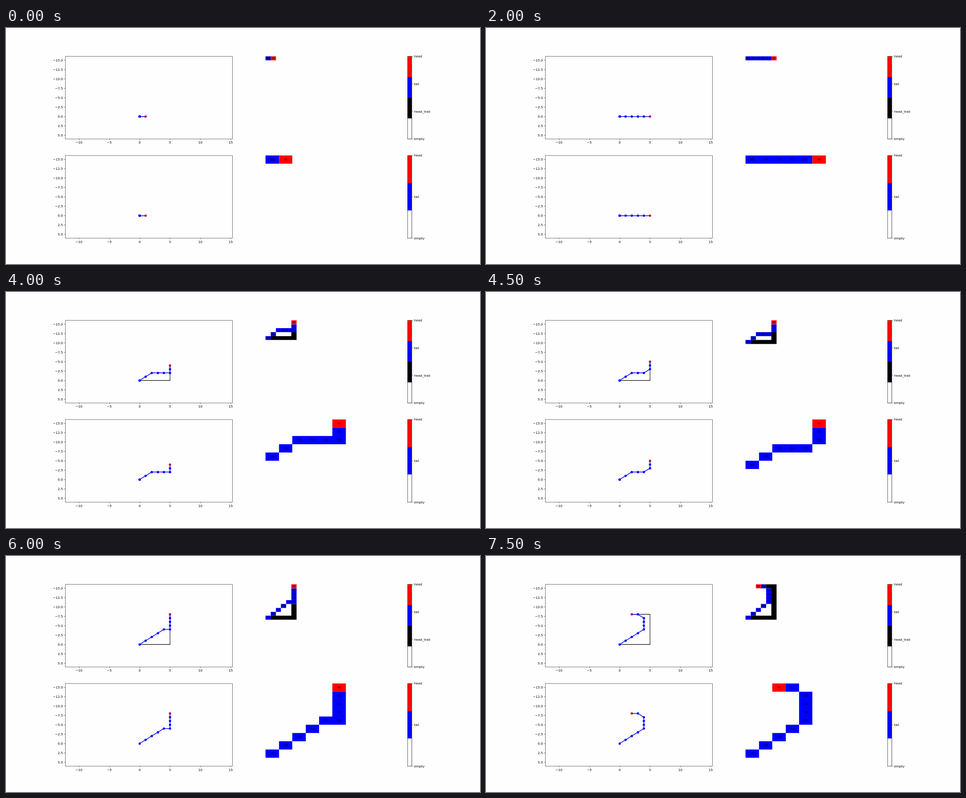
Animation, 1058 px wide and 529 px high, one loop 8 s. Source, as an HTML page with a canvas:

```html
<!DOCTYPE html>
<html lang="en">
<head>
<meta charset="utf-8">
<title>Rope simulation</title>
<style>
html, body { margin: 0; width: 100%; height: 100%; overflow: hidden; background: #fefefe; }
canvas { display: block; }
</style>
</head>
<body>
<canvas id="stage" width="1058" height="529"></canvas>
<script>
const ctx = document.getElementById("stage").getContext("2d");
const STEP_MS = 500, STEPS = 16, KNOTS = 10;
const PAPER = "#fefefe", RED = "#ff0000", BLUE = "#0000ff", BLACK = "#000000";

// The figure is laid out on a 2000 x 1000 sheet at 100 dots per inch.
const SCALE = 0.529, PT = 100 / 72;
const PLOT_X = 250, PLOT_W = 1550 / 2.2, PANEL_H = 350;
const GRID_X = PLOT_X + PLOT_W * 1.2, GRID_W = PLOT_W * 0.8;
const BAR_X = GRID_X + PLOT_W * 0.85, BAR_W = 17.5;
const X_MIN = -12.25, X_SPAN = 27.5, Y_MIN = -16, Y_SPAN = 22;
const TICK = 3.5 * PT, TICK_BASE = 5.3, CELL_BASE = 4;

const rows = [
  { top: 120, cols: 26, lines: 21, trail: true,
    legend: [["head", RED], ["tail", BLUE], ["head_trail", BLACK], ["empty", PAPER]] },
  { top: 540, cols: 10, lines: 10, trail: false,
    legend: [["head", RED], ["tail", BLUE], ["empty", PAPER]] }
];

const snap = v => Math.floor(v + 0.5) + 0.5;
const plotX = x => PLOT_X + (x - X_MIN) / X_SPAN * PLOT_W;
const plotY = (y, top) => top + (y - Y_MIN) / Y_SPAN * PANEL_H;
const minus = s => s.replace("-", "\u2212");

// Each knot steps towards the one ahead once it is no longer adjacent.
function simulate() {
  let rope = Array.from({ length: KNOTS }, () => [0, 0]);
  const trail = [[0, 0]], states = [];
  for (let i = 0; i < STEPS; i++) {
    const move = i < 5 ? [1, 0] : i < 13 ? [0, -1] : [-1, 0];
    rope = rope.map(k => k.slice());
    rope[0][0] += move[0];
    rope[0][1] += move[1];
    for (let k = 1; k < KNOTS; k++) {
      const dx = rope[k - 1][0] - rope[k][0], dy = rope[k - 1][1] - rope[k][1];
      if (Math.max(Math.abs(dx), Math.abs(dy)) > 1) {
        rope[k][0] += Math.sign(dx);
        rope[k][1] += Math.sign(dy);
      }
    }
    trail.push(rope[0]);
    states.push({ rope, trail: trail.slice() });
  }
  return states;
}

function segment(x1, y1, x2, y2) {
  ctx.beginPath();
  ctx.moveTo(x1, y1);
  ctx.lineTo(x2, y2);
  ctx.stroke();
}

function label(text, x, baseline, align) {
  ctx.fillStyle = BLACK;
  ctx.textAlign = align;
  ctx.fillText(text, x, baseline);
}

function frame(x, y, w, h) {
  const left = snap(x), top = snap(y);
  ctx.strokeRect(left, top, snap(x + w) - left, snap(y + h) - top);
}

function drawAxes(top) {
  const bottom = top + PANEL_H;
  for (let x = -10; x <= 15; x += 5) {
    const px = plotX(x);
    segment(snap(px), bottom, snap(px), bottom + TICK);
    label(minus(String(x)), px, bottom + 2 * TICK + 10.7, "center");
  }
  for (let y = -15; y <= 5; y += 2.5) {
    const py = plotY(y, top);
    segment(PLOT_X - TICK, snap(py), PLOT_X, snap(py));
    label(minus(y.toFixed(1)), PLOT_X - 2 * TICK, py + TICK_BASE, "right");
  }
  frame(PLOT_X, top, PLOT_W, PANEL_H);
}

function drawLegend({ top, legend }) {
  const n = legend.length, band = PANEL_H / n, gap = PANEL_H / (n - 1);
  const left = Math.round(BAR_X), end = BAR_X + BAR_W;
  // Every band reaches the bottom, so the next one covers it without a seam.
  legend.forEach(([, color], i) => {
    const y = Math.round(top + i * band);
    ctx.fillStyle = color;
    ctx.fillRect(left, y, Math.round(end) - left, top + PANEL_H - y);
  });
  frame(BAR_X, top, BAR_W, PANEL_H);
  legend.forEach(([name], i) => {
    const y = top + i * gap;
    segment(end, snap(y), end + TICK, snap(y));
    label(name, end + 2 * TICK, y + TICK_BASE, "left");
  });
}

function polyline(points, top, color, width) {
  // Only purely horizontal and vertical paths sit on whole pixels.
  const straight = points.every((p, i) => !i || p[0] === points[i - 1][0] || p[1] === points[i - 1][1]);
  const half = Math.round(width) % 2 / 2;
  const fit = straight ? v => Math.floor(v + 0.5) + half : v => v;
  ctx.save();
  ctx.strokeStyle = color;
  ctx.lineWidth = width;
  ctx.lineCap = "square";
  ctx.lineJoin = "round";
  ctx.beginPath();
  points.forEach(([x, y]) => ctx.lineTo(fit(plotX(x)), fit(plotY(y, top))));
  ctx.stroke();
  ctx.restore();
}

function dot([x, y], top, color) {
  ctx.fillStyle = color;
  ctx.beginPath();
  ctx.arc(Math.round(plotX(x)), Math.round(plotY(y, top)), 3.5 * PT, 0, Math.PI * 2);
  ctx.fill();
}

function drawRope({ rope, trail }, row) {
  if (row.trail) polyline(trail, row.top, BLACK, 1.5 * PT);
  dot(rope[0], row.top, RED);
  polyline(rope, row.top, BLUE, 2 * PT);
  rope.slice(1).forEach(k => dot(k, row.top, BLUE));
}

function drawGrid({ rope, trail }, row) {
  const colors = new Map();
  const paint = (points, color) => points.forEach(p => colors.set(p.join(), color));
  if (row.trail) paint(trail, BLACK);
  paint(rope.slice(1), BLUE);
  paint(rope.slice(0, 1), RED);

  const cells = [...colors].map(([key, color]) => [...key.split(",").map(Number), color]);
  const minX = Math.min(...cells.map(c => c[0])), minY = Math.min(...cells.map(c => c[1]));
  const w = GRID_W / row.cols, h = PANEL_H / row.lines;
  const left = x => GRID_X + (x - minX) * w, upper = y => row.top + (y - minY) * h;

  // One path per colour keeps neighbouring cells free of seams.
  for (const color of [BLACK, BLUE, RED]) {
    ctx.beginPath();
    for (const [x, y, c] of cells) {
      if (c !== color) continue;
      const x1 = Math.round(left(x)), y1 = Math.round(upper(y));
      ctx.rect(x1, y1, Math.round(left(x + 1)) - x1, Math.round(upper(y + 1)) - y1);
    }
    ctx.fillStyle = color;
    ctx.fill();
  }
  rope.forEach(([x, y], i) =>
    label(i ? "T" + i : "H", left(x + 0.5), upper(y + 0.5) + CELL_BASE, "center"));
}

const states = simulate();

function draw(now) {
  const state = states[Math.floor(now / STEP_MS) % STEPS];
  ctx.setTransform(SCALE, 0, 0, SCALE, 0, 0);
  ctx.fillStyle = PAPER;
  ctx.fillRect(0, 0, 2000, 1000);
  ctx.font = `${10 * PT}px "DejaVu Sans", sans-serif`;
  ctx.strokeStyle = BLACK;
  ctx.lineWidth = 0.8 * PT;
  for (const row of rows) {
    drawRope(state, row);
    drawAxes(row.top);
    drawGrid(state, row);
    drawLegend(row);
  }
}

const start = performance.now();
function tick() {
  draw(performance.now() - start);
  requestAnimationFrame(tick);
}
tick();
</script>
</body>
</html>
```
